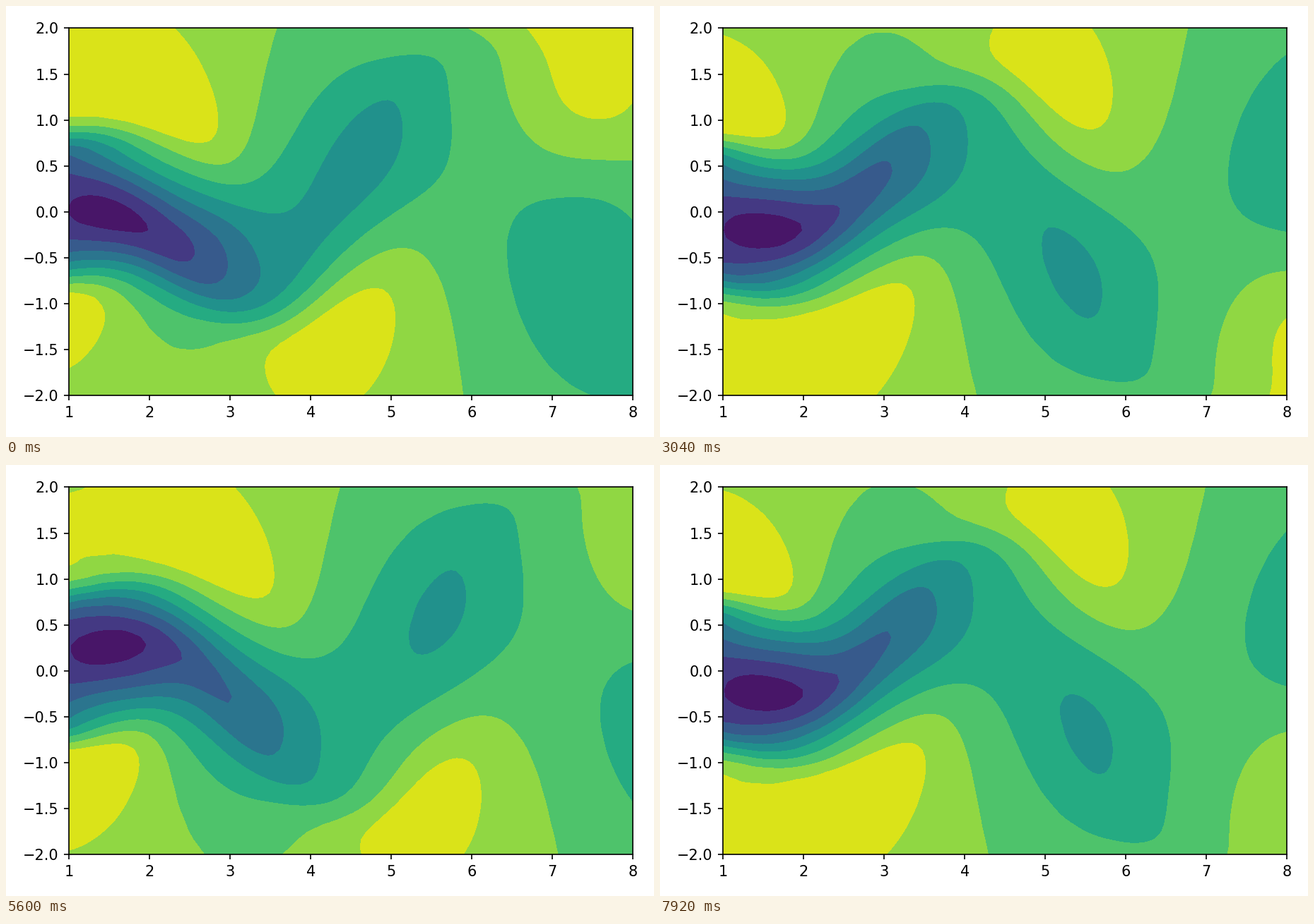
Recreate the animation shown at these times as a matplotlib script. Size 917x611 px, loop 8 s.

```python
import numpy as np
import matplotlib.pyplot as plt
from matplotlib.animation import FuncAnimation

W, H, DPI = 917, 611, 150
FRAMES, INTERVAL = 100, 80
PERIOD = 59                       # frames per vortex shedding cycle
SYNC_FRAME = 3                    # frame at which the probe signal turns positive
LEVELS = np.linspace(-0.4, 1.4, 10)

# Flow past a unit cylinder at Re = 100 in a periodic box
N, SIZE = 144, 16
X0, Y0 = -4, -8
VISCOSITY, DT, SPIN_UP = 0.01, 0.025, 26
POROSITY = 0.04

h = SIZE / N
x, y = np.meshgrid(X0 + h * np.arange(N), Y0 + h * np.arange(N))
kx = 2 * np.pi * np.fft.rfftfreq(N, h)[None, :]
ky = 2 * np.pi * np.fft.fftfreq(N, h)[:, None]
k2 = kx ** 2 + ky ** 2
inv_k2 = 1 / np.where(k2 == 0, 1, k2)
keep = np.sqrt(k2) < 2 / 3 * np.pi / h
decay = keep * np.exp(-VISCOSITY * k2 * DT)
to_u, to_v = 1j * ky * inv_k2, -1j * kx * inv_k2

solid = 0.5 * (1 - np.tanh((np.hypot(x, y) - 0.5) / 0.06)) / POROSITY
fringe = 4 * np.exp(-((x - 10.8) / 0.9) ** 4)    # restores the uniform inflow
drag = solid + fringe


def to_grid(spectrum):
    return np.fft.irfft2(spectrum, s=(N, N))


def start_vorticity():
    """Vorticity of a meandering wake, close to the final cycle."""
    reach = 0.5 * (np.tanh(x) - np.tanh(x - 9))
    axis = 0.4 * np.sin(1.35 * x)
    deficit = 0.6 * reach * np.exp(-((y - axis) / 0.6) ** 2)
    return keep * 1j * ky * np.fft.rfft2(deficit)


def tendency(w):
    """Advection, cylinder drag and inflow forcing; also returns u."""
    u, v, vort = 1 + to_grid(to_u * w), to_grid(to_v * w), to_grid(w)
    fx = np.fft.rfft2(v * vort - drag * u + fringe)
    fy = np.fft.rfft2(-u * vort - drag * v)
    return 1j * (kx * fy - ky * fx), u


def probe(u):
    """Asymmetry of the wake at x = 4 minus that at x = 2."""
    mid, near, far = N // 2, int((2 - X0) / h + 0.5), int((4 - X0) / h + 0.5)
    return (u[mid + 7, far] - u[mid - 7, far]) - (u[mid + 5, near] - u[mid - 5, near])


def shedding_cycle():
    """Vorticity spectra over one full cycle, beginning at an upward crossing."""
    w = start_vorticity()
    old, last = None, 0
    states = []
    for step in range(2400):
        rate, u = tendency(w)
        signal = probe(u)
        crossed = last < 0 <= signal
        last = signal
        if crossed and states:
            break
        if states or (crossed and step * DT > SPIN_UP):
            states.append(w)
        old = rate if old is None else old
        w = decay * (w + DT * (1.5 * rate - 0.5 * decay * old))
        old = rate
    return states


# Fourier sums that sample the speed on the plotted window
xs, ys = np.linspace(1, 8, 100), np.linspace(-2, 2, 50)
wave_x = np.where(kx.T > 0, 2, 1) * np.exp(1j * kx.T * (xs - X0))
wave_y = np.exp(1j * ky.T * (ys[:, None] - Y0)) / N ** 2
cycle = shedding_cycle()


def speed_at(frame):
    place = (frame - SYNC_FRAME) / PERIOD % 1 * len(cycle)
    i, part = int(place), place % 1
    w = (1 - part) * cycle[i % len(cycle)] + part * cycle[(i + 1) % len(cycle)]
    u = 1 + (wave_y @ (to_u * w) @ wave_x).real
    return np.clip(u, -0.39, 1.39)


plt.rcParams["font.family"] = "DejaVu Sans"
fig = plt.figure(figsize=((W + 1e-6) / DPI, (H + 1e-6) / DPI), dpi=DPI)
left, right, top, bottom = 89.2, 887.3, 31.4, 552.3
ax = fig.add_axes([left / W, 1 - bottom / H, (right - left) / W, (bottom - top) / H])
ax.set_xlim(1, 8)
ax.set_ylim(-2, 2)
ax.set_xticks(range(1, 9))
ax.set_yticks(np.arange(-2, 2.1, 0.5))

bands = []


def update(frame):
    while bands:
        bands.pop().remove()
    bands.append(ax.contourf(xs, ys, speed_at(frame), levels=LEVELS, cmap="viridis"))
    return bands


anim = FuncAnimation(fig, update, frames=FRAMES, interval=INTERVAL, repeat=True,
                     repeat_delay=0, blit=False)
plt.show()
```
